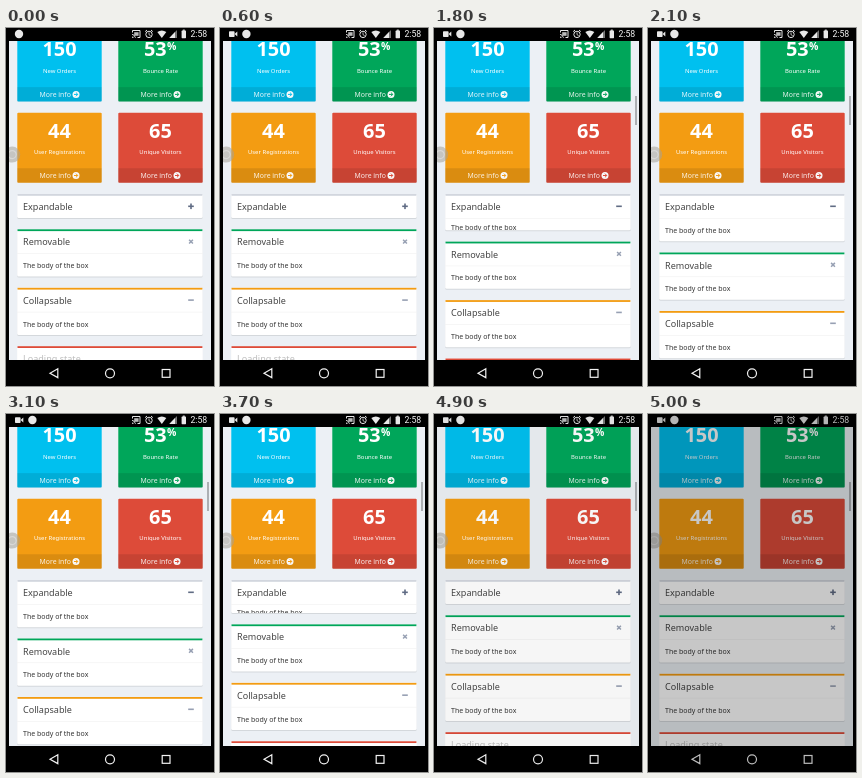
An HTML page with a canvas for the animation above (5100 ms loop, 208 by 358 pixels).

```html
<!DOCTYPE html>
<html lang="en">
<head>
<meta charset="utf-8">
<title>Collapsible boxes</title>
<style>
html, body { margin: 0; width: 100%; height: 100%; overflow: hidden; background: #000; }
canvas { display: block; width: 208px; height: 358px; }
</style>
</head>
<body>
<canvas id="stage"></canvas>
<script>
const W = 208, H = 358, LOOP = 5100;
const SANS = '"Noto Sans", "Open Sans", sans-serif';
const canvas = document.getElementById('stage');
const ctx = canvas.getContext('2d');
const scale = window.devicePixelRatio || 1;
canvas.width = W * scale;
canvas.height = H * scale;

// The screen only refreshes at these moments while a box slides.
const TICKS = [0, 1500, 1800, 1900, 2000, 2100, 3400, 3700, 3900, 4000];
const BODY_H = 23.2;
const BOX_X = 11.2, BOX_W = 185.5;

const clamp = v => Math.max(0, Math.min(1, v));
const swing = v => 0.5 - Math.cos(Math.PI * clamp(v)) / 2;

function rect(x, y, w, h, color) {
  ctx.fillStyle = color;
  ctx.fillRect(x, y, w, h);
}

function round(x, y, w, h, r, color) {
  ctx.fillStyle = color;
  ctx.beginPath();
  ctx.roundRect(x, y, w, h, r);
  ctx.fill();
}

function disc(x, y, r, color) {
  ctx.fillStyle = color;
  ctx.beginPath();
  ctx.arc(x, y, r, 0, Math.PI * 2);
  ctx.fill();
}

function ring(x, y, r, color, width) {
  ctx.strokeStyle = color;
  ctx.lineWidth = width;
  ctx.beginPath();
  ctx.arc(x, y, r, 0, Math.PI * 2);
  ctx.stroke();
}

function trace(points) {
  ctx.beginPath();
  points.forEach(([x, y], i) => i ? ctx.lineTo(x, y) : ctx.moveTo(x, y));
}

function line(points, color, width) {
  ctx.strokeStyle = color;
  ctx.lineWidth = width;
  trace(points);
  ctx.stroke();
}

function poly(points, color) {
  ctx.fillStyle = color;
  trace(points);
  ctx.fill();
}

function text(str, x, y, size, color, align = 'left', weight = 400, family = SANS) {
  ctx.font = `${weight} ${size}px ${family}`;
  ctx.textAlign = align;
  ctx.fillStyle = color;
  ctx.fillText(str, x, y);
}

function tile(x, y, color, value, label, sup) {
  const cx = x + 42.2;
  round(x, y, 84.4, 70, 1, color);
  rect(x, y + 55.5, 84.4, 14.5, 'rgba(0,0,0,.1)');
  text(value, sup ? cx - 5.2 : cx, y + 24.8, 19.9, '#fff', 'center', 700);
  if (sup) text(sup, cx + 6.4, y + 18.4, 10.4, '#fff', 'left', 700);
  text(label, cx, y + 41.4, 5.95, '#fff', 'center', 500);
  text('More info', cx - 20, y + 65.4, 6.9, 'rgba(255,255,255,.9)', 'left', 500);
  const ax = cx + 16.5, ay = y + 62.8;
  disc(ax, ay, 3.5, '#f8f8f8');
  line([[ax - 2, ay], [ax + 1.6, ay]], color, 1);
  line([[ax - .1, ay - 1.9], [ax + 1.8, ay], [ax - .1, ay + 1.9]], color, 1);
}

function icon(kind, y, color) {
  const x = 185;
  if (kind === 'x') {
    line([[x - 1.9, y - 1.9], [x + 1.9, y + 1.9]], color, 1.5);
    line([[x + 1.9, y - 1.9], [x - 1.9, y + 1.9]], color, 1.5);
    return;
  }
  rect(x - 2.8, y - .8, 5.6, 1.6, color);
  if (kind === '+') rect(x - .8, y - 2.8, 1.6, 5.6, color);
}

// open: how much of the body is shown, 0 to 1
function box(y, color, title, kind, iconColor, open) {
  const h = 24 + BODY_H * open;
  round(BOX_X, y + 1, BOX_W, h, 1.5, 'rgba(0,0,0,.1)');
  round(BOX_X, y, BOX_W, h, 1.5, '#fff');
  rect(BOX_X + .3, y, BOX_W - .6, 1.8, color);
  text(title, 17, y + 16.1, 9.05, '#444', 'left', 500);
  icon(kind, y + 12.3, iconColor);
  if (open > 0) {
    rect(BOX_X, y + 24, BOX_W, .6, '#f0f0f0');
    ctx.save();
    ctx.beginPath();
    ctx.rect(BOX_X, y + 24, BOX_W, h - 24);
    ctx.clip();
    text('The body of the box', 17, y + 33.2 + 5.6 * open, 7, '#333');
    ctx.restore();
  }
}

function page(open, kind, barOn) {
  ctx.save();
  ctx.beginPath();
  ctx.rect(3, 13, 202, 319);
  ctx.clip();
  rect(3, 13, 202, 319, '#ecf0f5');

  tile(11.3, 3.6, '#00c0ef', '150', 'New Orders');
  tile(112.3, 3.6, '#00a65a', '53', 'Bounce Rate', '%');
  tile(11.3, 84.7, '#f39c12', '44', 'User Registrations');
  tile(112.3, 84.7, '#dd4b39', '65', 'Unique Visitors');

  const shift = BODY_H * open;
  box(166, '#d2d6de', 'Expandable', kind, '#606c84', open);
  box(201.3 + shift, '#00a65a', 'Removable', 'x', '#97a0b3', 1);
  box(259.8 + shift, '#f39c12', 'Collapsable', '-', '#97a0b3', 1);
  const y = 318.2 + shift;
  box(y, '#dd4b39', 'Loading state', '', '#fff', 1);
  rect(BOX_X, y + 1.8, BOX_W, 46, 'rgba(255,255,255,.65)');

  disc(6.2, 126.6, 8, 'rgba(165,162,152,.55)');
  ring(6.2, 126.6, 4, 'rgba(235,235,235,.5)', 1.2);
  if (barOn) rect(201, 68, 2, 29, 'rgba(130,132,136,.6)');
  ctx.restore();
}

function statusBar(camera) {
  const c = '#e8e8e8';
  if (camera > 0) {
    ctx.globalAlpha = camera;
    round(9, 3.2, 5.6, 5.8, .8, c);
    poly([[14.6, 6], [17.3, 3.4], [17.3, 8.6]], c);
    ctx.globalAlpha = 1;
  }
  disc(13 + 13.4 * camera, 6, 4.2, c);

  // cast
  line([[126.5, 4.5], [126.5, 2.5], [134, 2.5], [134, 9.5], [131.5, 9.5]], c, 1);
  rect(128.2, 4.2, 4.4, 3.6, '#bbb');
  line([[126, 6.3], [128, 7.2], [129.5, 9.8]], c, .9);
  disc(126.8, 9.2, .8, c);

  // alarm
  ring(143, 6.4, 3.2, c, 1);
  line([[143, 4.4], [143, 6.7], [144.6, 7.6]], c, .8);
  line([[139.2, 3.6], [141, 2]], c, 1);
  line([[146.8, 3.6], [145, 2]], c, 1);

  // wifi
  ctx.fillStyle = c;
  ctx.beginPath();
  ctx.moveTo(155.8, 10);
  ctx.lineTo(151.3, 4);
  ctx.quadraticCurveTo(155.8, 1, 160.3, 4);
  ctx.fill();

  // signal
  poly([[163.3, 10], [171, 10], [171, 2]], '#777');
  poly([[163.3, 10], [169, 10], [169, 4.1]], c);

  // battery
  round(175.6, 2.6, 4.4, 7.6, .6, c);
  rect(176.8, 1.6, 2, 1.2, c);

  text('2:58', 201.2, 9.3, 8.7, '#f4f4f4', 'right', 400, 'Roboto, Arial, sans-serif');
}

function navBar() {
  const c = '#f2f2f2';
  ctx.strokeStyle = c;
  ctx.lineWidth = 1.2;
  trace([[44, 345.2], [51.8, 340.8], [51.8, 349.6]]);
  ctx.closePath();
  ctx.stroke();
  ring(104, 345.3, 4.5, c, 1.2);
  ctx.strokeRect(156.2, 341.5, 7.8, 7.8);
}

function draw(t) {
  const held = TICKS.filter(v => v <= t).pop();
  const open = held < 3400 ? swing((held - 1540) / 500) : 1 - swing((held - 3415) / 500);
  const kind = held >= 1500 && held < 3400 ? '-' : '+';

  ctx.setTransform(scale, 0, 0, scale, 0, 0);
  rect(0, 0, W, H, '#000');
  page(open, kind, t >= 1500);
  statusBar(swing((t - 50) / 350));
  navBar();

  const dim = t >= 5000 ? .22 : t >= 4900 ? .035 : 0;
  if (dim) rect(0, 0, W, H, `rgba(0,0,0,${dim})`);
}

const start = performance.now();
function loop() {
  draw((performance.now() - start) % LOOP);
  requestAnimationFrame(loop);
}
loop();
</script>
</body>
</html>
```
